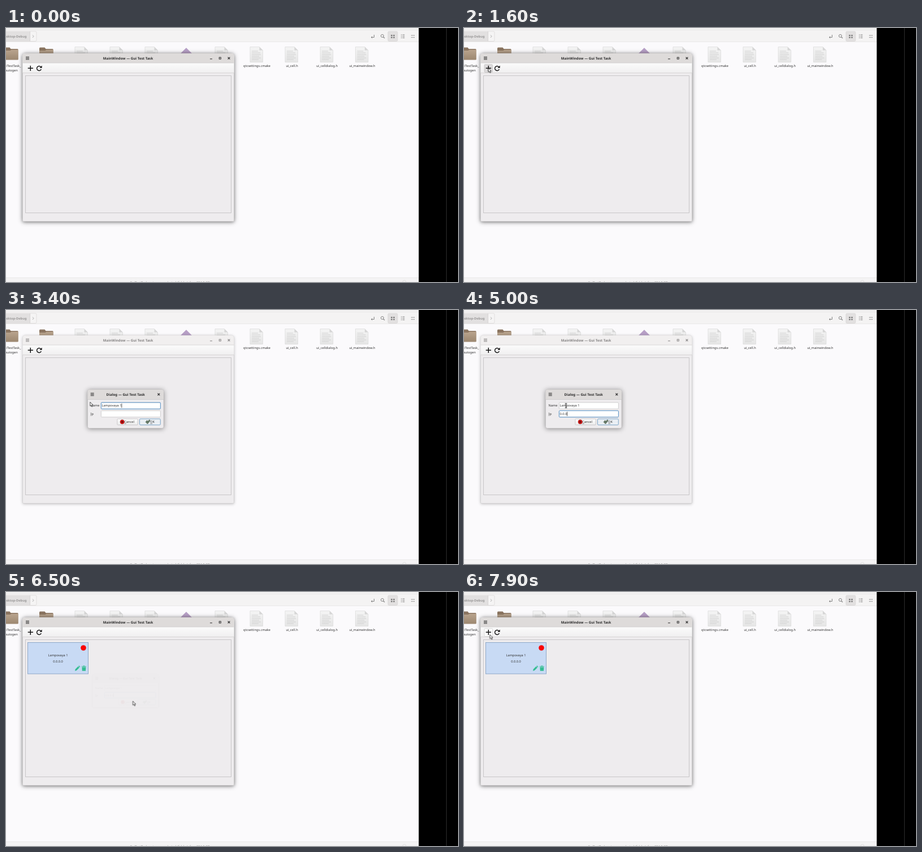
An HTML page for the animation above (8 s loop, 800 px wide and 450 px high).

```html
<!DOCTYPE html>
<html lang="en">
<head>
<meta charset="utf-8">
<title>Main window demo</title>
<style>
html, body { margin: 0; width: 100%; height: 100%; overflow: hidden; background: #000; }
svg { display: block; width: 800px; height: 450px; }
text { font: 5.65px "Noto Sans", sans-serif; fill: #333; text-rendering: geometricPrecision; white-space: pre; }
.mid { text-anchor: middle; }
.title { font-size: 6.1px; font-weight: 700; text-anchor: middle; fill: currentColor; }
.line { fill: none; stroke: currentColor; }
.hidden { opacity: 0; }

.weak { filter: drop-shadow(0 1px 2.5px rgba(0,0,0,.24)); }
.strong { filter: drop-shadow(0 1.5px 4px rgba(0,0,0,.42)); }

.active, .cell, .hover, .press, .arrow, .beam { animation: 8s step-end infinite; }
.active { animation-name: active; }
.cell { animation-name: cell; }
.hover { animation-name: hover; }
.press { animation-name: press; }
.arrow { animation-name: arrow; }
.beam { animation-name: beam; }
.dialog { transform-origin: 211.5px 175px; animation: dialog 8s linear infinite; }
.cursor { animation: cursor 8s ease-in-out infinite; }

@keyframes active { 0%, 80% { opacity: 1 } 21.25% { opacity: 0 } }
@keyframes cell { 0% { opacity: 0 } 79% { opacity: 1 } }
@keyframes hover { 0%, 18% { opacity: 0 } 15.5%, 96.25% { opacity: 1 } }
@keyframes press { 0%, 21.25% { opacity: 0 } 18% { opacity: 1 } }
@keyframes arrow { 0%, 75.5% { opacity: 1 } 47% { opacity: 0 } }
@keyframes beam { 0%, 75.5% { opacity: 0 } 47% { opacity: 1 } }
@keyframes dialog {
  0%, 21.25% { opacity: 0; transform: scale(.85) }
  22.4%, 79% { opacity: 1; transform: none }
  81.35%, 100% { opacity: 0; transform: scale(.86) }
}
@keyframes cursor {
  0%, 1.24% { opacity: 0; transform: translate(625px, 217px) }
  1.25% { opacity: 1; transform: translate(625px, 217px) }
  5% { transform: translate(621px, 213px) }
  16%, 22% { transform: translate(43px, 71px) }
  27%, 34% { transform: translate(154.5px, 180.5px) }
  40%, 45% { transform: translate(148.8px, 163px) }
  48%, 71% { transform: translate(180.5px, 169.5px) }
  79%, 82.5% { transform: translate(224.5px, 193.3px) }
  92.5% { transform: translate(136px, 134px) }
  97.5%, 100% { opacity: 1; transform: translate(45.8px, 75.5px) }
}
</style>
</head>
<body>
<svg viewBox="0 0 800 450">
  <defs>
    <linearGradient id="paper" x2="0" y2="1">
      <stop stop-color="#f4f4f4"/><stop offset="1" stop-color="#e6e6e6"/>
    </linearGradient>
    <linearGradient id="tan" x2="0" y2="1">
      <stop stop-color="#b9a48e"/><stop offset="1" stop-color="#9c8770"/>
    </linearGradient>
    <linearGradient id="bar" x2="0" y2="1">
      <stop stop-color="#fbfbfb"/><stop offset="1" stop-color="#f0eff0"/>
    </linearGradient>
    <linearGradient id="button" x2="0" y2="1">
      <stop stop-color="#fdfdfd"/><stop offset="1" stop-color="#ececec"/>
    </linearGradient>
    <g id="file">
      <path d="M-11 33.500H5.500L11.500 39.500V60.500H-11Z" fill="url(#paper)" stroke="#d8d8d8" stroke-width=".7"/>
      <path d="M5.500 33.500V39.500H11.500Z" fill="#d6d6d6"/>
      <path d="M-8 41H3M-8 44H7M-8 47H8M-8 50H5M-8 53H8M-8 56H4" stroke="#cbcbcb" stroke-width=".9"/>
    </g>
    <g id="folder">
      <path d="M-12.500 36q0-1.500 1.500-1.500H-3l2 2.500H11q1 0 1 1.500V56H-12.500Z" fill="#8a7460"/>
      <path d="M-12.500 40H-2l2-1.500H12V55.500q0 1-1 1H-11.500q-1 0-1-1Z" fill="url(#tan)"/>
    </g>
    <g id="menu"><path class="line" d="M-3 -2.200H3M-3 0H3M-3 2.200H3"/></g>
    <g id="close"><path class="line" d="M-1.900 -1.900L1.900 1.900M1.900 -1.900L-1.900 1.900" stroke-width="1.200"/></g>
    <g id="chrome">
      <use href="#menu" x="38" y="53.500"/>
      <text class="title" x="216" y="56">MainWindow — Gui Test Task</text>
      <path class="line" d="M361 54.800H365"/>
      <rect class="line" x="377.300" y="52" width="3" height="3"/>
      <use href="#close" x="394.500" y="53.500"/>
    </g>
    <path id="titlebar" d="M29.500 62V50q0-5 5-5H398.500q5 0 5 5V62Z"/>
    <path id="frame" d="M29.500 341V50q0-5 5-5H398.500q5 0 5 5V341q0 1.500-1.500 1.500H31q-1.500 0-1.500-1.500Z"/>
  </defs>

  <!-- file manager -->
  <rect width="731" height="450" fill="#fbfafc"/>
  <rect width="731" height="24.500" fill="#f4f3f3"/>
  <path d="M0 3.500H731M0 24.500H731M0 442.500H731" stroke="#e6e5e5" stroke-width=".8"/>
  <rect y="443" width="731" height="7" fill="#f4f3f4"/>
  <rect x="-5" y="6" width="59" height="17.500" rx="2" fill="#f5f4f4" stroke="#dcdada" stroke-width=".8"/>
  <rect y="6" width="42.500" height="17.500" fill="#e2e0e0"/>
  <path d="M42.500 6V23.500" stroke="#d2d0d0" stroke-width=".8"/>
  <text x="36.500" y="16.600" text-anchor="end" style="font-weight:700;font-size:5.700px;fill:#9a9898">Desktop-Debug</text>
  <path d="M47 12.500L49 14.700L47 17" fill="none" stroke="#999" stroke-width=".8"/>
  <g color="#777" stroke-width=".9">
    <path class="line" d="M651.500 12V16.500H646.500M648.300 14.700L646.500 16.500L648.300 18.200"/>
    <circle class="line" cx="666" cy="14" r="2.500"/>
    <path class="line" d="M667.800 15.800L670.200 18.200" stroke-width="1.200"/>
    <rect x="676" y="6" width="17" height="17.500" rx="2" fill="#e2e0e0" stroke="#d6d4d5" stroke-width=".7"/>
    <path class="line" d="M681.400 13.200H683.800M685.400 13.200H687.800M681.400 16.900H683.800M685.400 16.900H687.800" stroke-width="2.400"/>
    <path class="line" d="M699 12H700.500M699 14.700H700.500M699 17.400H700.500M701.700 12H705.500M701.700 14.700H705.500M701.700 17.400H705.500"/>
    <path class="line" d="M717.200 13.200H718.500M719.500 13.200H720.800M721.800 13.200H723.100M717.200 16.600H718.500M719.500 16.600H720.800M721.800 16.600H723.100" stroke-width="1.200"/>
  </g>
  <use href="#folder" x="9.500"/>
  <use href="#folder" x="71.500"/>
  <g id="files"></g>
  <path d="M319 35L331 47L319 59L307 47Z" fill="#b79fc6"/>
  <text class="mid" x="9.600" y="69.200">GuiTestTask_</text>
  <text class="mid" x="9.600" y="77">autogen</text>
  <text class="mid" x="288.500" y="453" style="fill:#888">«GuiTestTask_autogen» selected (folder), free 304.3 GB</text>
  <circle cx="705" cy="450" r="3" fill="none" stroke="#ddd" stroke-width=".8"/>
  <rect x="730.500" width="69.500" height="450"/>
  <path d="M779.500 0V450" stroke="#333" stroke-width=".9"/>

  <!-- main window -->
  <use href="#frame" class="active strong" fill="#eeecee"/>
  <use href="#frame" class="weak" fill="#eeecee" stroke="#c4c2c3" stroke-width=".5"/>
  <use href="#titlebar" fill="#f1efef"/>
  <use href="#chrome" color="#858383"/>
  <g class="active">
    <use href="#titlebar" fill="#dedbda"/>
    <use href="#chrome" color="#2b2b2b"/>
  </g>
  <rect x="29.500" y="62" width="374" height="17.500" fill="url(#bar)"/>
  <path d="M29.500 62H403.500M29.500 79.600H403.500" stroke="#cecccc" stroke-width=".7"/>
  <rect class="hover hidden" x="36" y="64.500" width="14.500" height="14" rx="1.500" fill="#fdfdfd" stroke="#cecece" stroke-width=".7"/>
  <rect class="press hidden" x="36" y="64.500" width="14.500" height="14" rx="1.500" fill="#dcdadb" stroke="#c2c0c1" stroke-width=".7"/>
  <path d="M43.300 66.700V76M38.700 71.300H48" stroke="#111" stroke-width="1.500"/>
  <path d="M61.600 68.900A4 4 0 1 0 62.300 73" fill="none" stroke="#111" stroke-width="1.400"/>
  <path d="M63.600 66.600V70.800H59.400Z" fill="#111"/>
  <rect x="34.500" y="84.500" width="364" height="243" fill="none" stroke="#c4c2c4" stroke-width=".9"/>

  <g class="cell hidden">
    <rect x="38.500" y="89.500" width="107" height="55.500" fill="#c8daf4" stroke="#86a3c4" stroke-width=".9"/>
    <circle cx="137" cy="99" r="4.800" fill="#f80505"/>
    <text class="mid" x="92" y="114">Lampovaya 1</text>
    <text class="mid" x="92" y="125">0.0.0.0</text>
    <g fill="#34bd92">
      <path d="M122 139.700L122.700 136.800L127.700 131.800L129.900 134L124.900 139ZM128.300 131.200L129.200 130.300L131.400 132.500L130.500 133.400Z"/>
      <path d="M133.800 131.400H136.200L136.800 130.500H139L139.600 131.400H142V132.600H133.800ZM134.400 133.200H141.400L141 139.800H134.800Z"/>
    </g>
  </g>

  <!-- dialog -->
  <g class="dialog hidden">
    <rect class="strong" x="144.500" y="141" width="134.500" height="68.500" rx="3" fill="#eeecee" stroke="#b4b2b2" stroke-width=".5"/>
    <path d="M144.500 158.500V146q0-5 5-5H274q5 0 5 5V158.500Z" fill="#dedbda"/>
    <path d="M144.500 158.500H279" stroke="#c6c4c4" stroke-width=".7"/>
    <g color="#2b2b2b">
      <use href="#menu" x="152.700" y="149.500"/>
      <text class="title" x="211.700" y="152">Dialog — Gui Test Task</text>
      <use href="#close" x="270.300" y="149.500"/>
    </g>
    <text x="149.500" y="171.200">Name</text>
    <text x="149.500" y="186">Ip</text>
    <path d="M149.500 187H151.200" stroke="#333" stroke-width=".5"/>
    <g fill="#fff" stroke="#c6c4c6" stroke-width=".8">
      <rect x="168.400" y="163.900" width="105" height="11.400" rx="1.200"/>
      <rect x="168.400" y="178.500" width="105" height="11.200" rx="1.200"/>
    </g>
    <rect id="focus" x="168.400" width="105" height="11.400" rx="1.200" fill="none" stroke="#5793c9"/>
    <text id="name" x="169.500" y="171.400"></text>
    <text id="ip" x="169.500" y="186"></text>
    <rect id="caret" width=".7" height="7.500" fill="#111"/>
    <rect x="196.900" y="192.900" width="36.500" height="10.800" rx="1.500" fill="url(#button)" stroke="#c0bec0" stroke-width=".8"/>
    <rect x="236.500" y="192.900" width="36.800" height="10.800" rx="1.500" fill="#eaeff4" stroke="#6f9cc2" stroke-width=".9"/>
    <circle cx="205.700" cy="198.200" r="3.700" fill="#d01717" stroke="#a01010" stroke-width=".5"/>
    <rect x="204.200" y="196.700" width="3" height="3" fill="#6d0a0a"/>
    <path d="M247 198.500L249.500 195.500L251 197L254 194.300L255.200 196L250.500 202Z" fill="#667a66" stroke="#4c5a4e" stroke-width=".5"/>
    <text x="209.300" y="200.300">Cancel</text>
    <text x="255" y="200.300">OK</text>
    <path d="M209.500 201.500H212.700M255.200 201.500H259.200" stroke="#333" stroke-width=".5"/>
  </g>

  <g class="cursor hidden">
    <path class="arrow" d="M0 0V7.200L1.700 5.700L3 8.500L4.300 7.900L3.100 5.200H5.200Z" fill="#f6f6f6" stroke="#111" stroke-width=".7"/>
    <path class="beam hidden" d="M-1.800 -3.800H1.800M0 -3.800V3.800M-1.800 3.800H1.800" fill="none" stroke="#222" stroke-width="1.100"/>
  </g>
</svg>
<script>
const LOOP = 8000, TAB_TIME = 3700, OPEN_TIME = 1650;
const el = id => document.getElementById(id);

const labels = { 443.5: "qtcsettings.cmake", 505.5: "ui_cell.h", 567.7: "ui_celldialog.h", 630: "ui_mainwindow.h" };
el("files").innerHTML =
  [133, 195, 257, 381].map(x => `<use href="#file" x="${x}"/>`).join("") +
  Object.entries(labels).map(([x, label]) =>
    `<use href="#file" x="${x - .5}"/><text class="mid" x="${+x + .5}" y="69.2">${label}</text>`).join("");

// Each field: its text and the time of every key press.
const field = (id, text, keyTime) => ({ node: el(id), text, keys: [...text].map((_, i) => keyTime(i)) });
const nameField = field("name", "Lampovaya 1", i => i < 10 ? 2300 + i * 88 : 3300);
const ipField = field("ip", "0.0.0.0", i => 4500 + i * 120);

function type({ node, text, keys }, time) {
  const count = keys.filter(key => key <= time).length;
  const shown = text.slice(0, count);
  if (node.textContent !== shown) node.textContent = shown;
  return count;
}

function draw(now) {
  const time = Math.floor(now % LOOP / 100) * 100;
  const counts = [type(nameField, time), type(ipField, time)];
  const row = time < TAB_TIME ? 0 : 1;
  const { node, keys } = [nameField, ipField][row];
  const lastInput = counts[row] ? keys[counts[row] - 1] : [OPEN_TIME, TAB_TIME][row];
  const top = row ? 178.4 : 163.9;
  el("focus").setAttribute("y", top);
  el("caret").setAttribute("x", 169.6 + (counts[row] ? node.getComputedTextLength() : 0));
  el("caret").setAttribute("y", top + 1.9);
  el("caret").style.opacity = (time - lastInput) % 1000 < 500 ? 1 : 0;
  requestAnimationFrame(draw);
}
requestAnimationFrame(draw);
</script>
</body>
</html>
```
